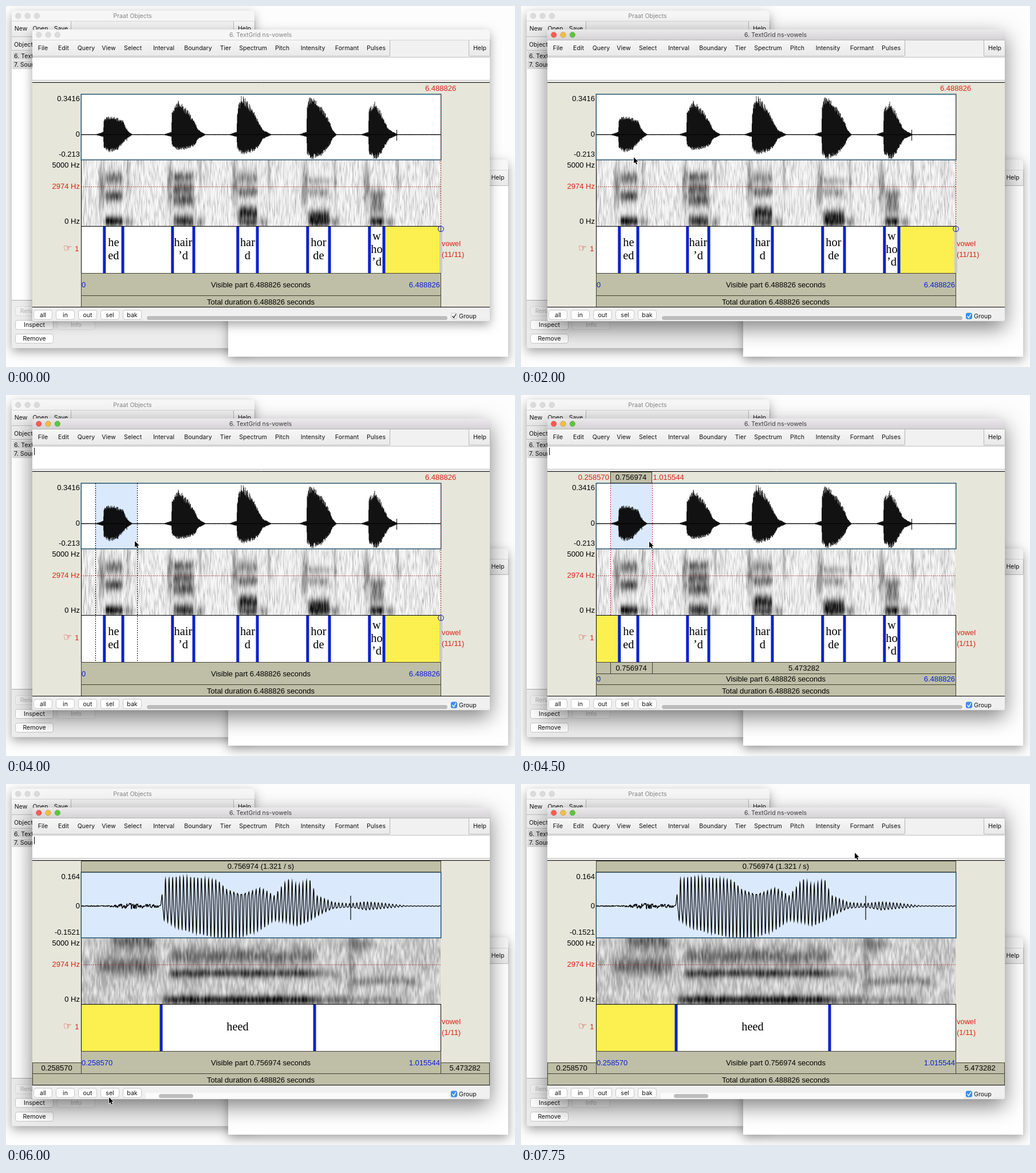
Write an HTML page with a canvas that moves like this. It is 889x630 px and loops after 8 s.

```html
<!DOCTYPE html>
<html lang="en">
<head>
<meta charset="utf-8">
<title>Sound editor</title>
<style>
html, body { margin: 0; width: 100%; height: 100%; overflow: hidden; background: #fdfdfd; }
canvas { display: block; width: 100vw; height: 100vh; }
</style>
</head>
<body>
<canvas id="stage" width="889" height="630"></canvas>
<script>
const ctx = document.getElementById('stage').getContext('2d');
const LOOP = 8000, STEP = 250;
const LEFT = 131, RIGHT = 759, WAVE_TOP = 154, SPEC_TOP = 269, TIER_TOP = 384, TIER_BOTTOM = 466;
const RED = '#dc2314', BLUE = '#0a1fd8', OLIVE = '#bfbfa8', BEIGE = '#e6e6da', YELLOW = '#fbf04f', SELECTED = '#dbe9fc';
const UI = '10.6px Inter, sans-serif', PLOT = '13px "Liberation Sans", sans-serif', WORD = '20.4px "Liberation Serif", serif';

const CURSOR = [
  [1000, 300, 420], [1750, 152, 258], [2000, 197, 264], [2500, 160, 250], [3500, 152, 250], [4000, 225, 255],
  [4500, 224, 256], [5500, 180, 547], [6250, 180, 547], [7500, 568, 203], [7750, 583, 120]
];
const CARET_FLIPS = [2250, 2750, 3250, 4750, 5250, 6750, 7250, 7750];

// up: heights at onset, peak and end; down: depths at peak and end; formants: [y, half height, darkness]
const VOWELS = [
  { lines: ['he', 'ed'], from: 171, to: 205, peak: 181, up: [27, 34, 25], down: [32, 14], tail: 220, burst: 211,
    formants: [[375, 9, .85], [331, 10, .7], [300, 12, .5]] },
  { lines: ['hair', '’d'], from: 290, to: 329, peak: 301, up: [42, 61, 24], down: [28, 20], tail: 348, burst: 337,
    formants: [[375, 12, .75], [339, 11, .6], [318, 11, .6], [298, 9, .5]] },
  { lines: ['har', 'd'], from: 404, to: 440, peak: 412, up: [44, 72, 26], down: [35, 24], tail: 463, burst: 457,
    formants: [[361, 12, .85], [378, 8, .55], [324, 10, .5], [300, 11, .38]] },
  { lines: ['hor', 'de'], from: 526, to: 566, peak: 532, up: [56, 70, 23], down: [45, 18], tail: 577, burst: 573,
    formants: [[366, 11, .75], [378, 8, .65], [324, 9, .3], [305, 8, .25]] },
  { lines: ['w', 'ho', '’d'], from: 634, to: 661, peak: 644, up: [45, 58, 24], down: [45, 22], tail: 684, burst: 682,
    formants: [[376, 9, .85], [350, 16, .45], [329, 11, .4]] }
];
// [x, height above zero, depth below zero]
const overviewEnvelope = VOWELS.flatMap(({ from, to, peak, up, down, tail }) => [
  [from - 13, .6, .6], [from - 1, 5, 4], [from, up[0], down[0] * .75], [peak, up[1], down[0]],
  [mix(peak, to, .6), mix(up[1], up[2], .5), mix(down[0], down[1], .3)], [to, up[2], down[1]],
  [mix(to, tail, .35), 9, 8], [tail, .6, .6]
]);
const ZOOM_ENVELOPE = [
  [175, .7, .7], [215, 5, 5], [270, 2, 2], [276, 45, 30], [300, 52, 44], [370, 59, 53], [385, 42, 55], [410, 34, 51],
  [445, 44, 39], [468, 22, 24], [492, 52, 29], [510, 38, 37], [530, 47, 30], [542, 18, 22], [572, 6, 6],
  [600, 4, 3], [628, 7, 10], [660, 5, 5], [700, .6, .6]
];

// [x start, x end, y centre, half height, darkness]
const overviewBands = VOWELS.flatMap(({ from, to, burst, formants }) => [
  ...formants.map(f => [from + 2, to - 2, ...f]),
  [from - 9, from, 314, 38, .42], [to + 2, to + 16, 377, 9, .36], [burst, burst + 3, 295, 40, .36]
]);
const ZOOM_BANDS = [
  [185, 258, 274, 16, .5], [158, 265, 318, 16, .5],
  [274, 540, 376, 8, .9], [286, 539, 330, 8, .72], [288, 539, 301, 15, .47],
  [541, 600, 377, 8, .4], [541, 574, 330, 8, .3], [601, 604, 325, 75, .55],
  [604, 640, 280, 12, .38], [604, 715, 344, 8, .32], [606, 690, 377, 8, .32]
];

function mix(a, b, k) { return a + (b - a) * k; }
const hash = (x, y) => { const v = Math.sin(x * 127.1 + y * 311.7) * 43758.5453; return v - Math.floor(v); };

function noise(x, y) {
  const i = Math.floor(x), j = Math.floor(y), u = x - i, v = y - j;
  return mix(mix(hash(i, j), hash(i + 1, j), u), mix(hash(i, j + 1), hash(i + 1, j + 1), u), v);
}

// Interpolates rows of [key, a, b].
function sample(rows, key) {
  let i = 1;
  while (i < rows.length - 1 && rows[i][0] < key) i++;
  const a = rows[i - 1], b = rows[i];
  const k = Math.min(1, Math.max(0, (key - a[0]) / (b[0] - a[0])));
  return [mix(a[1], b[1], k), mix(a[2], b[2], k)];
}

function spectrogram(bands, zoomed) {
  const w = RIGHT - LEFT, h = TIER_TOP - SPEC_TOP, edge = zoomed ? 3.5 : 1.2;
  const layer = document.createElement('canvas');
  layer.width = w; layer.height = h;
  const c = layer.getContext('2d'), img = c.createImageData(w, h);
  for (let px = 0; px < w; px++) {
    const x = px + LEFT;
    const weights = bands.map(b => b[4] / (1 + Math.exp((Math.abs(x - (b[0] + b[1]) / 2) - (b[1] - b[0]) / 2) / edge)));
    const pulse = zoomed ? .92 + .1 * Math.sin(x * 2 * Math.PI / 6.3) : 1;
    for (let py = 0; py < h; py++) {
      const y = py + SPEC_TOP;
      const n = zoomed
        ? .7 * noise(x / 2.2, y / 9 + hash(Math.floor(x / 2), 3)) + .3 * noise(x / 14, y / 14)
        : noise(x / 1.25, y / 10 + 5 * hash(Math.floor(x / 2), 7));
      let dark = 0;
      bands.forEach((b, i) => { if (weights[i] > .004) dark += weights[i] * Math.exp(-(((y - b[2]) / b[3]) ** 2)); });
      const ground = zoomed ? 250 - 98 * n : 252 - 72 * n * n;
      const g = ground * Math.max(.06, 1 - Math.min(1, dark) * pulse * (.68 + .52 * n));
      img.data.set([g, g, g, 255], (py * w + px) * 4);
    }
  }
  c.putImageData(img, 0, 0);
  return layer;
}
const overviewSpec = spectrogram(overviewBands, false);
const zoomSpec = spectrogram(ZOOM_BANDS, true);

function text(s, x, y, color = '#000', font = PLOT, align = 'left') {
  ctx.font = font; ctx.fillStyle = color; ctx.textAlign = align;
  ctx.textBaseline = font === UI ? 'middle' : 'alphabetic';
  ctx.fillText(s, x, y);
}
const label = (s, x, y, color = '#111') => text(s, x, y, color, UI, 'center');
const rightText = (s, x, y, color) => text(s, x, y, color, PLOT, 'right');

function fill(x, y, w, h, color) { ctx.fillStyle = color; ctx.fillRect(x, y, w, h); }

function box(x, y, w, h, color, border = '#000') {
  fill(x, y, w, h, color);
  ctx.strokeStyle = border; ctx.lineWidth = 1;
  ctx.strokeRect(x + .5, y + .5, w, h);
}

function line(x1, y1, x2, y2, color = '#000', dash = [], width = 1) {
  ctx.strokeStyle = color; ctx.lineWidth = width; ctx.setLineDash(dash);
  ctx.beginPath(); ctx.moveTo(x1, y1); ctx.lineTo(x2, y2); ctx.stroke();
  ctx.setLineDash([]);
}

function round(x, y, w, h, r, color, border) {
  ctx.beginPath(); ctx.roundRect(x, y, w, h, r);
  ctx.fillStyle = color; ctx.fill();
  if (border) { ctx.strokeStyle = border; ctx.lineWidth = 1; ctx.stroke(); }
}

function dot(x, y, color, border) {
  ctx.beginPath(); ctx.arc(x, y, 4.8, 0, 7);
  ctx.fillStyle = color; ctx.fill();
  ctx.strokeStyle = border; ctx.lineWidth = .6; ctx.stroke();
}

function shade(y, h, top, bottom) {
  const g = ctx.createLinearGradient(0, y, 0, y + h);
  g.addColorStop(0, top); g.addColorStop(1, bottom);
  return g;
}

function windowFrame(x, y, w, h, title, active) {
  ctx.save();
  ctx.shadowColor = active ? 'rgba(0,0,0,.5)' : 'rgba(0,0,0,.36)';
  ctx.shadowBlur = active ? 36 : 18;
  ctx.shadowOffsetY = active ? 12 : 6;
  round(x, y, w, h, [5, 5, 3, 3], '#ececec');
  ctx.restore();
  round(x, y, w, 19, [5, 5, 0, 0], active ? shade(y, 19, '#ebe9eb', '#d3d1d3') : '#f6f6f6');
  line(x, y + 18.5, x + w, y + 18.5, active ? '#b5b5b5' : '#d5d5d5');
  const lights = active ? ['#fb5a50', '#f6bd3c', '#5bc63c'] : Array(3).fill('#dcdcdc');
  lights.forEach((c, i) => dot(x + 11.3 + i * 16.3, y + 9.3, c, active ? 'rgba(0,0,0,.25)' : '#cacaca'));
  label(title, x + w / 2 - 1, y + 10, active ? '#3c3c3c' : '#858585');
}

function menu(names, edges, y, h) {
  names.forEach((name, i) => {
    const x = edges[i], w = edges[i + 1] - x;
    fill(x, y, w, h, shade(y, h, '#f7f7f7', '#e9e9e9'));
    line(x + w + .5, y, x + w + .5, y + h, '#b4b4b4');
    label(name, x + w / 2 + .5, y + h / 2);
  });
  line(edges[0], y + h + .5, edges[edges.length - 1], y + h + .5, '#bdbdbd');
}

function button(name, x, y, w, enabled = true) {
  round(x + .5, y + .5, w - 1, 16, 3.5, enabled ? '#fff' : '#f1f1f1', enabled ? '#c6c6c6' : '#dcdcdc');
  label(name, x + w / 2, y + 9, enabled ? '#111' : '#b5b5b5');
}

function backWindows() {
  fill(0, 0, 889, 630, '#fdfdfd');
  windowFrame(10, 8, 424, 589, 'Praat Objects', false);
  fill(10, 27, 424, 26, '#f0f0f0');
  menu(['New', 'Open', 'Save'], [10, 41, 78, 113], 27, 26);
  line(397.5, 27, 397.5, 53, '#b4b4b4');
  menu(['Help'], [398, 434], 27, 26);
  text('Objects:', 14, 68, '#111', UI);
  fill(10, 77, 424, 436, '#fff');
  line(10, 77.5, 434, 77.5, '#aaa');
  line(10, 513.5, 434, 513.5, '#aaa');
  ['6. TextGrid ns-vowels', '7. Sound ns-vowels'].forEach((s, i) => {
    fill(11, 79 + i * 16, 250, 15, '#dcdcdc');
    text(s, 14, 87.5 + i * 15.5, '#111', UI);
  });
  button('Rename...', 16, 524, 67, false);
  button('Inspect', 16, 548, 67);
  button('Info', 89, 548, 67, false);
  button('Remove', 16, 572, 67);

  windowFrame(388, 268, 489, 344, '', false);
  fill(388, 287, 489, 26, '#ececec');
  menu(['Help'], [840, 877], 287, 26);
  fill(388, 314, 489, 298, '#fff');
  line(388, 313.5, 877, 313.5, '#bbb');
}

function editorChrome(active, zoomed) {
  windowFrame(46, 41, 799, 509, '6. TextGrid ns-vowels', active);
  fill(46, 60, 799, 28, '#f1f1f1');
  menu(['File', 'Edit', 'Query', 'View', 'Select', 'Interval', 'Boundary', 'Tier', 'Spectrum', 'Pitch', 'Intensity', 'Formant', 'Pulses'],
    [46, 82, 118, 161, 197, 245, 305, 365, 401, 461, 503, 568, 622, 670], 60, 27);
  line(808.5, 60, 808.5, 87, '#b4b4b4');
  menu(['Help'], [809, 845], 60, 27);
  fill(46, 89, 799, 40, '#fff');
  line(46, 89.5, 845, 89.5, '#c4c4c4');
  line(46, 129.5, 845, 129.5, '#c4c4c4');
  fill(46, 134, 799, 391, BEIGE);
  line(46, 133.5, 845, 133.5);
  fill(46, 526, 799, 21, '#f0f0f0');
  ['all', 'in', 'out', 'sel', 'bak'].forEach((s, i) => button(s, 48 + i * 39, 530.5, 33));
  fill(244, 539, 530, 10, zoomed ? '#fafafa' : '#f4f4f4');
  round(zoomed ? 267 : 246, 541, zoomed ? 60 : 525, 7, 3.5, '#bdbdbd');
  round(777.5, 536, 10, 10, 2, active ? '#3f8ff7' : '#fff', active ? '#3280e8' : '#c0c0c0');
  ctx.beginPath(); ctx.moveTo(779.5, 541); ctx.lineTo(782, 544); ctx.lineTo(786, 537.5);
  ctx.strokeStyle = active ? '#fff' : '#222'; ctx.lineWidth = 1.4; ctx.stroke();
  text('Group', 791, 541.5, '#111', UI);
}

function overviewWave() {
  ctx.beginPath();
  for (let x = LEFT; x <= RIGHT; x += .5) {
    const [up, down] = sample(overviewEnvelope, x);
    ctx.moveTo(x, 224.4 - up * (.76 + .24 * hash(x, 1)));
    ctx.lineTo(x, 224.6 + down * (.76 + .24 * hash(x, 2)));
  }
  ctx.strokeStyle = '#000'; ctx.lineWidth = .8; ctx.stroke();
  line(LEFT, 224.5, RIGHT, 224.5);
  line(211, 214, 211, 235);
  line(682.5, 216, 682.5, 235);
}

function zoomWave() {
  ctx.beginPath();
  for (let x = LEFT; x <= RIGHT; x += .3) {
    const [up, down] = sample(ZOOM_ENVELOPE, x), phase = x * 2 * Math.PI / 6.3;
    const v = x < 272 ? 2 * hash(Math.floor(x / .9), 4) - 1
      : (Math.sin(phase) + .3 * Math.sin(phase * 2 + 1 + x / 60)) / 1.2;
    ctx.lineTo(x, 213 - v * (v > 0 ? up : down));
  }
  ctx.strokeStyle = '#000'; ctx.lineWidth = 1.25; ctx.stroke();
  line(602, 195, 602, 237, '#000', [], 1.2);
}

function boundary(x) { fill(x - 2.5, TIER_TOP + 1, 5, TIER_BOTTOM - TIER_TOP - 1, '#0a22cd'); }

function tier(zoomed, first) {
  box(LEFT, TIER_TOP, 628, 82, '#fff');
  if (zoomed) {
    fill(LEFT + 1, 385, 138, 81, YELLOW);
    boundary(271);
    boundary(539);
    text('heed', 404.5, 430, '#000', WORD, 'center');
    return;
  }
  if (first) fill(LEFT + 1, 385, 39, 81, YELLOW);
  else { fill(662, 385, 96, 81, YELLOW); fill(757, 394, 5, 72, '#cbcbcb'); }
  VOWELS.forEach(({ lines, from, to }) => {
    const left = from + .8, right = to - 1;
    lines.forEach((s, i) => text(s, (left + right) / 2, 430.5 + (i - (lines.length - 1) / 2) * 22.5, '#000', WORD, 'center'));
    boundary(left);
    boundary(right);
  });
}

function plots(zoomed, selection, first) {
  fill(LEFT, WAVE_TOP, 628, 114, zoomed ? SELECTED : '#fff');
  if (selection) fill(selection[0], WAVE_TOP, selection[1] - selection[0], 114, SELECTED);
  if (zoomed) zoomWave(); else overviewWave();
  ctx.drawImage(zoomed ? zoomSpec : overviewSpec, LEFT, SPEC_TOP);
  ctx.strokeStyle = '#174a68'; ctx.lineWidth = 1.4;
  ctx.strokeRect(LEFT + .3, WAVE_TOP, 628.4, 114.5);
  line(LEFT, 315.5, RIGHT, 315.5, '#a83a35', [2, 1.5], .9);
  tier(zoomed, first);
  line(LEFT + .5, SPEC_TOP, LEFT + .5, TIER_BOTTOM);
  if (!zoomed && !first) {
    line(759.5, WAVE_TOP, 759.5, TIER_TOP, '#8a2020', [2, 2]);
    ctx.beginPath(); ctx.arc(759.5, 389, 4.8, 0, 7);
    ctx.strokeStyle = '#1c2fd0'; ctx.lineWidth = 1.1; ctx.stroke();
  }
  rightText(zoomed ? '0.164' : '0.3416', 129, 166);
  rightText('0', 129, zoomed ? 217 : 228);
  rightText(zoomed ? '-0.1521' : '-0.213', 129, 263);
  rightText('5000 Hz', 129, 282);
  rightText('2974 Hz', 129, 319, RED);
  rightText('0 Hz', 129, 380);
  text('☞', 100, 428, RED, '17px "DejaVu Sans", sans-serif');
  rightText('1', 127.5, 428, RED);
  text('vowel', 761, 419, RED);
  text(first || zoomed ? '(1/11)' : '(11/11)', 761, 438, RED);
}

function bar(x, y, w, h, s = '', baseline = 0) {
  box(x, y, w, h, OLIVE, '#3f3f30');
  text(s, x + w / 2, baseline, '#000', PLOT, 'center');
}

function durations(zoomed, selected) {
  const top = selected ? 486 : TIER_BOTTOM, base = selected ? 500 : 491;
  bar(LEFT, top, 628, 505 - top, `Visible part ${zoomed ? '0.756974' : '6.488826'} seconds`, base);
  text(zoomed ? '0.258570' : '0', 132, base, BLUE);
  rightText(zoomed ? '1.015544' : '6.488826', 758, base, BLUE);
  if (zoomed) {
    bar(LEFT, 134, 628, 19, '0.756974 (1.321 / s)', 148);
    bar(46, 486, 85, 19, '0.258570', 500);
    bar(RIGHT, 486, 85, 19, '5.473282', 500);
  } else if (selected) {
    rightText('0.258570', 154, 148, RED);
    text('1.015544', 230.5, 148, RED);
    bar(156, 134, 72, 19, '0.756974', 148);
    bar(LEFT, TIER_BOTTOM, 25, 20);
    bar(156, TIER_BOTTOM, 73, 20, '0.756974', 481);
    bar(229, TIER_BOTTOM, 530, 20, '5.473282', 481);
  } else text('6.488826', 759, 148, RED, PLOT, 'center');
  bar(zoomed ? 46 : LEFT, 505, zoomed ? 798 : 628, 20, 'Total duration 6.488826 seconds', 521);
  line(46, 525.5, 845, 525.5);
}

function pointer(x, y) {
  const shape = [[0, 0], [0, 10.6], [2.4, 8.5], [4.3, 12.6], [6.1, 11.8], [4.3, 7.8], [7.6, 7.6]];
  ctx.beginPath();
  shape.forEach(([dx, dy]) => ctx.lineTo(x + dx, y + dy));
  ctx.closePath();
  ctx.strokeStyle = '#fff'; ctx.lineWidth = 1.6; ctx.lineJoin = 'round'; ctx.stroke();
  ctx.lineJoin = 'miter';
  ctx.fillStyle = '#000'; ctx.fill();
}

function render(t) {
  const active = t >= 2000, zoomed = t >= 6000, selected = t >= 4250 && !zoomed, dragging = t >= 3500 && t < 4250;
  const [cx, cy] = sample(CURSOR, t);
  const selection = dragging ? [156, cx + 4] : selected ? [156, 229] : null;
  backWindows();
  editorChrome(active, zoomed);
  plots(zoomed, selection, selected);
  durations(zoomed, selected);
  if (selection) selection.forEach(x => line(Math.round(x) + .5, WAVE_TOP, Math.round(x) + .5,
    dragging ? TIER_BOTTOM : TIER_TOP, dragging ? '#000' : '#c22a2a', [2, 2]));
  if (CARET_FLIPS.filter(f => f <= t).length % 2) fill(49, 92, 1, 13, '#000');
  if (t >= 1000) pointer(cx, cy);
}

let shown = 0;
const start = performance.now();
function tick(now) {
  const t = Math.floor(Math.max(0, now - start) % LOOP / STEP) * STEP;
  if (t !== shown) render(shown = t);
  requestAnimationFrame(tick);
}
render(0);
requestAnimationFrame(tick);
</script>
</body>
</html>
```
